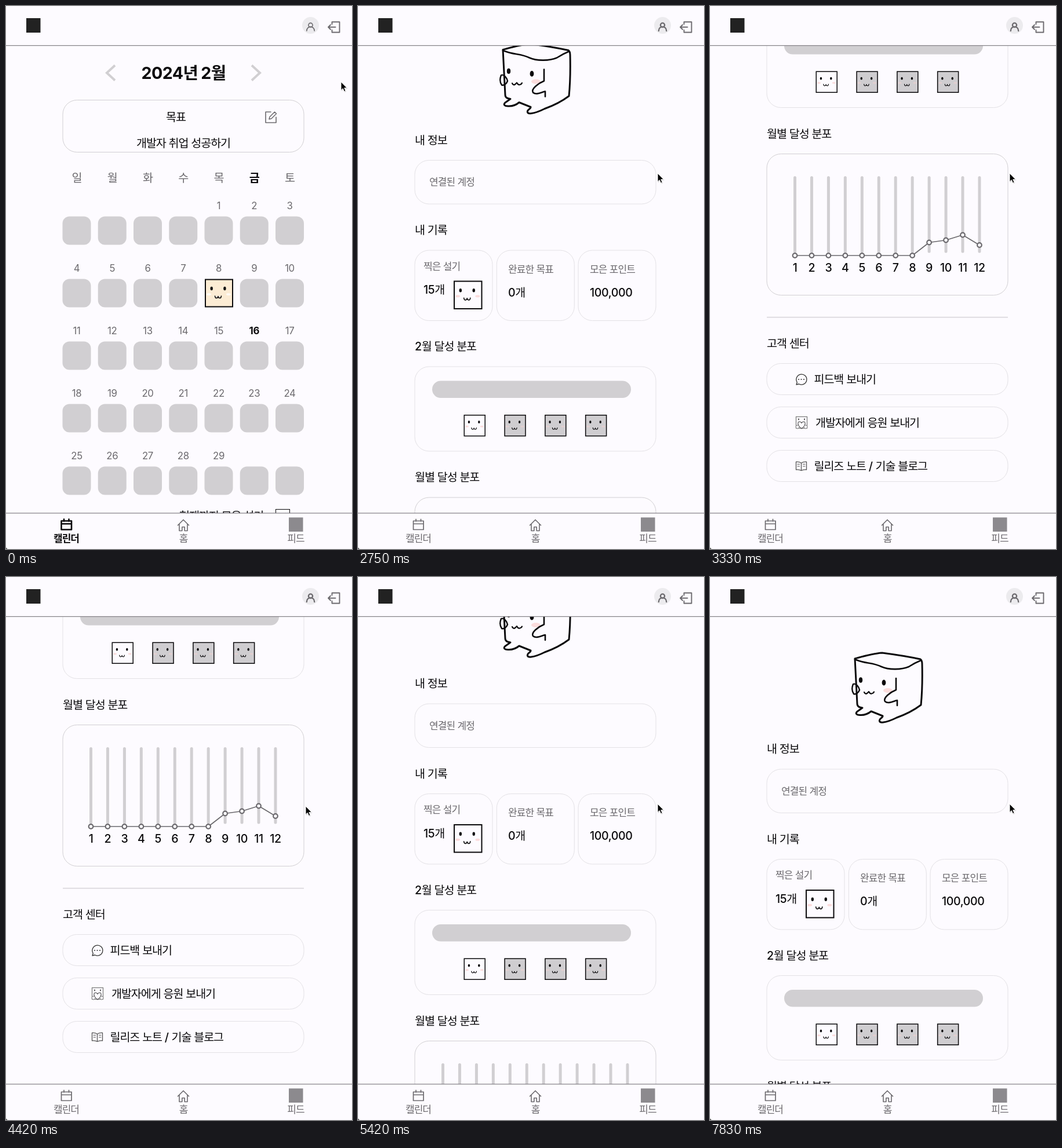
Write an HTML page that moves like this. It is 597x938 px and loops after 8.08 s.

```html
<!DOCTYPE html>
<html lang="ko">
<head>
<meta charset="utf-8">
<title>Calendar and profile</title>
<style>
  html, body { margin: 0; width: 100%; height: 100%; overflow: hidden; background: #fdfbff; }
  svg { display: block; width: 597px; height: 938px; }
  text { font-family: Inter, "Noto Sans CJK KR", "Noto Sans CJK", sans-serif; letter-spacing: -.02em; white-space: pre; }
  .ko { letter-spacing: -.056em; }
  .line { fill: none; stroke-linecap: round; stroke-linejoin: round; }
</style>
</head>
<body>
<svg id="stage" viewBox="0 0 597 938" xmlns="http://www.w3.org/2000/svg"></svg>
<script>
const LOOP = 8080, STEP = 250 / 3;
const BG = '#fdfbff', INK = '#0b0a0c', GREY = '#6b696d', CELL = '#d1cfd2', PALE = '#e3e1e5';

// ---------- drawing helpers (y of a text is its visual middle) ----------
function text(x, y, str, size = 19.6, o = {}) {
  const body = str.replace(/[가-힣]+/g, '<tspan class="ko">$&</tspan>');
  return `<text x="${x}" y="${y + size * .37}" font-size="${size}" font-weight="${o.weight || 500}"
    fill="${o.fill || INK}" text-anchor="${o.anchor || 'start'}">${body}</text>`;
}
const mid = (x, y, str, size, o = {}) => text(x, y, str, size, { ...o, anchor: 'middle' });
const box = (x, y, w, h, r, fill, stroke = 'none', sw = 1) =>
  `<rect x="${x}" y="${y}" width="${w}" height="${h}" rx="${r}" fill="${fill}" stroke="${stroke}" stroke-width="${sw}"/>`;
const line = (d, stroke, sw, more = '') =>
  `<path class="line" d="${d}" stroke="${stroke}" stroke-width="${sw}" ${more}/>`;
const oval = (x, y, rx, ry, fill, more = '') =>
  `<ellipse cx="${x}" cy="${y}" rx="${rx}" ry="${ry}" fill="${fill}" ${more}/>`;
const range = n => [...Array(n).keys()];

function face(x, y, size, fill, cheek) {
  return `<g transform="translate(${x} ${y}) scale(${size / 49})">
    ${box(1, 1, 47, 47, 0, fill, INK, 2)}
    ${oval(7, 26.5, 4, 2, cheek)}${oval(41, 26.5, 4, 2, cheek)}
    ${oval(11.7, 16.5, 2.2, 3.2, INK)}${oval(34.4, 16.5, 2.2, 3.2, INK)}
    ${line('M17.5 29.5q.5 4 3 3.5 2.5-.5 2.5-3 0 2.500 2.500 3 2.500.500 3-3.500', INK, 1.6)}</g>`;
}

// ---------- calendar page ----------
function calendar() {
  const colX = i => 122 + 61.25 * i;
  let s = line('M188 102.500L174 115.500L188 128.500M424 102.500L438 115.500L424 128.500', CELL, 4,
    'style="stroke-linecap:butt;stroke-linejoin:miter"');
  s += mid(306, 115, '2024년 2월', 28.6, { weight: 700 });
  s += box(98, 162.5, 416, 90, 24.5, 'none', CELL);
  s += mid(293, 192, '목표') + mid(306, 237, '개발자 취업 성공하기');
  s += line('M457 183H448V201.500H466V192', GREY, 1.6);
  s += line('M454 195.500L455 191.500L463.500 183L466.500 186L458 194.500Z', GREY, 1.5);
  [...'일월화수목금토'].forEach((d, i) => {
    s += mid(colX(i), 297, d, 19.6, i == 5 ? { weight: 700 } : { weight: 400, fill: GREY });
  });
  for (const i of range(35)) {
    const x = colX(i % 7), y = 363.5 + 108 * Math.floor(i / 7), day = i - 3;
    if (day > 0 && day < 30)
      s += mid(x, y - 18.5, String(day), 16.8, day == 16 ? { weight: 700 } : { weight: 400, fill: GREY });
    s += day == 8 ? face(x + .5 - 24.5, y - .5 + .5, 49, '#fcecd4', '#fffaf4')
                  : box(x - 24.5, y, 49, 49, 12, CELL);
  }
  return s + text(299, 880.5, '현재까지 모은 설기') + face(465, 869, 25, BG, '#fbe3e3');
}

// ---------- profile page, in scroll coordinates ----------
function mascot() {
  return `<path class="line" d="M250 141C264 137 283 132 297 131C320 134 345 138 363 142Q366 144 366 150
      Q367 190 364 221C352 230 336 238 322 243Q308 250 299 251C291 252 291 247 295 244Q298 242 298 240
      L278 232Q270 239 259 238.500C250 238 251 234 256 231L263 226Q254 225 254 219Q252 180 250 141Z"
      fill="#eeecef" stroke="${INK}" stroke-width="3"/>` +
    line('M250 142C266 150 280 147 296 155C309 161 331 160 343 155Q354 148 364 144', INK, 2.6) +
    oval(307, 196, 8, 4, '#fbdcdc') +
    oval(260, 178, 3.2, 4.8, INK) + oval(300, 182.5, 3.4, 5, INK) +
    line('M266 199q2 4 5 2l3-3q2 4 5 3.500 3-.5 4-3', INK, 2.2) +
    `<path class="line" d="M247 185C252 183 257 190 258 195C256 201 251 203 248 202Q243 195 247 185Z"
      fill="#eeecef" stroke="${INK}" stroke-width="2.4"/>` +
    line('M321 175V195C311 199 298 209 302 215C308 220 317 214 323 213L323 222', INK, 2.6);
}

function chart() {
  const x = i => 146.5 + 28.95 * i;
  const tail = [1067.5, 1063.5, 1054.5, 1072], y = i => i < 8 ? 1090 : tail[i - 8];
  const months = range(12);
  return box(98, 914.5, 416, 244, 24.5, 'none', CELL) +
    months.map(i => line(`M${x(i)} 955.500V1083`, CELL, 5)).join('') +
    line('M' + months.map(i => x(i) + ' ' + y(i)).join('L'), GREY, 1.7) +
    months.map(i => oval(x(i), y(i), 3.8, 3.8, BG, `stroke="${GREY}" stroke-width="2.2"`) +
      mid(x(i), 1110.5, String(i + 1))).join('');
}

function profile() {
  const soft = { weight: 400, fill: GREY };
  let s = mascot();
  s += text(98, 297, '내 정보') + box(98, 332, 416, 75.5, 24.5, 'none', PALE) + text(123, 369.5, '연결된 계정', 17, soft);
  s += text(98, 452.5, '내 기록');
  for (const x of [98, 239.3, 380]) s += box(x, 487.5, 134, 121.5, 24.5, 'none', PALE);
  s += text(113, 515, '찍은 설기', 17, soft) + text(113, 555.5, '15개') + face(165, 540, 49.5, BG, '#fbdcdc');
  s += text(259, 520, '완료한 목표', 17, soft) + text(259, 560, '0개');
  s += text(400, 520, '모은 포인트', 17, soft) + text(400, 560, '100,000');
  s += text(98, 653.5, '2월 달성 분포') + box(98, 688.5, 416, 146, 24.5, 'none', PALE);
  s += box(128, 713, 343, 29.5, 14.75, CELL);
  for (const i of range(4)) s += face(182.5 + 69.8 * i, 771.5, 37.5, i ? '#cfcdd0' : BG, i ? '#e2cfd0' : '#fbdcdc');
  s += text(98, 879.5, '월별 달성 분포') + chart();
  s += box(98, 1195.8, 416, 1.8, 0, '#dcdade') + text(98, 1242, '고객 센터');
  for (const i of range(3)) s += box(98, 1276.5 + 75 * i, 416, 54, 24.5, 'none', PALE);
  s += text(179.5, 1304, '피드백 보내기') + text(182, 1378.7, '개발자에게 응원 보내기') +
    text(179.5, 1453.5, '릴리즈 노트 / 기술 블로그');
  s += line('M149 1313L150.300 1309A9 9 0 1 1 153.500 1312Z', '#333', 1.3) +
    [153, 157.5, 162].map(x => oval(x, 1304, 1, 1, '#333')).join('');
  s += box(148.5, 1368.5, 19, 20, 0, BG, '#777', 1.2) +
    oval(153, 1373, .9, 1.4, '#333') + oval(163, 1373, .9, 1.4, '#333') +
    `<path class="line" d="M158 1389C150 1383 151 1377 154.500 1377Q157 1377 158 1379.500Q159 1377 161.500 1377
      C165 1377 166 1383 158 1389Z" fill="#fbdfd8" stroke="#444" stroke-width="1.100"/>` +
    [151, 165].map(x => oval(x, 1386, 3, 3, BG, 'stroke="#777"')).join('');
  s += line('M157.500 1448.500Q154 1446 148.500 1446.500V1460Q154 1459.500 157.500 1461.500Q161 1459.500 166.500 1460V1446.500Q161 1446 157.500 1448.500V1461', '#555', 1.3) +
    line('M151 1450.500h3.500M151 1454h3.500M160.500 1450.500h3.500M160.500 1454h3.500', '#555', 1.1);
  return s;
}

// ---------- fixed header and tab bar ----------
const person = 'M518.800 43C519 33.500 532 33.500 532.200 43M521.900 33a3.600 3.600 0 1 0 7.200 0a3.600 3.600 0 1 0 -7.200 0';
function bars() {
  return box(0, 0, 597, 68, 0, BG) + box(0, 67.8, 597, 1.1, 0, '#77757a') +
    box(35, 21, 24.5, 25, 0, '#222') +
    oval(525.5, 33.5, 14.5, 14.5, '#ecebee') + `<path id="person" class="line" d="${person}"/>` +
    line('M562.500 31.500V27.500H575.500V45.500H562.500V41.500M556 36.500H568.500M560 32.500L556 36.500L560 40.500', GREY, 1.9) +
    box(0, 876, 597, 62, 0, BG) + box(0, 875.5, 597, 1.1, 0, '#77757a') +
    `<g id="tabOn">${tab(INK, 2.6, 700)}</g><g id="tabOff">${tab(GREY, 1.7, 400)}</g>` +
    line('M296.500 897L306 887.500L315.500 897M299 895V906.500H303.800V900H308.200V906.500H313V895', GREY, 1.6) +
    mid(306, 920, '홈', 17, { weight: 400, fill: GREY }) +
    box(488, 883.5, 24.5, 24.5, 0, '#8c8a8e') + mid(500, 920, '피드', 17, { weight: 400, fill: GREY }) +
    '<path d="M0 935Q.5 937.500 3 938H0Z" fill="#333"/>';
}
function tab(color, sw, weight) {
  return line('M95.500 889.500H113V904.500H95.500ZM95.500 894.500H113M100 886.500V890M108.500 886.500V890', color, sw) +
    mid(104, 920, '캘린더', 17, { weight, fill: color });
}

const overlay = `<g id="status"><path d="M0 919.500H181Q185.500 919.500 185.500 924V938H0Z" fill="#cbdcfb" stroke="#b4c6e8"/>
  ${text(3, 929.5, 'https://100seolgi.click/my-page', 12, { weight: 400, fill: '#27303f' })}</g>
  <g id="arrow"><path d="M.8 1.500V16L4.300 12.800L6.500 18L9 17L6.800 11.900H11.500Z" fill="#000" opacity=".18"/>
  <path d="M0 0V14.500L3.300 11.500L5.500 16.700L8 15.600L5.800 10.600H10.300Z" fill="#000" stroke="#fff" stroke-width="1" stroke-linejoin="round"/></g>
  <path id="hand" d="M-2 1.200C-2.300-1 .3-1.300 .9 .5L2.300 6Q3.800 4.400 5 6.200Q6.700 5 7.600 6.800Q9.500 6.200 10 8.200L10.700 12
    Q10.800 14 9.500 16V17.500H2.800Q1 14-1.800 11.600C-3.800 9.300-1.500 8.300 .5 10Z" fill="#fff" stroke="#000" stroke-width="1.200" stroke-linejoin="round"/>`;

const stage = document.getElementById('stage');
stage.innerHTML = `<rect width="597" height="938" fill="${BG}"/><g id="calendar">${calendar()}</g>
  <g id="profile">${profile()}</g>${bars()}${overlay}`;
const el = id => document.getElementById(id);
const show = (id, on) => el(id).setAttribute('visibility', on ? 'visible' : 'hidden');

// ---------- motion: [time, values...] ----------
const pointer = [[0, 578, 131], [80, 581, 133], [250, 583, 113], [420, 568, 68], [580, 546, 37], [750, 531, 27],
  [830, 531, 27], [920, 528, 30], [1000, 526.5, 32], [1500, 526.5, 32], [1580, 526, 37], [1750, 524, 88],
  [2000, 520, 225], [2250, 517, 289], [3580, 517, 289], [3750, 517, 304], [4000, 517, 365], [4250, 517, 398],
  [4330, 517, 398], [4580, 517, 392]];
const scroll = [[2670, 0], [2750, 65.5], [2830, 185], [2920, 325], [3000, 445], [3080, 540], [3170, 605], [3250, 643],
  [3330, 659], [4670, 659], [4750, 650], [4830, 627], [4920, 592], [5000, 545.5], [5080, 455], [5170, 350],
  [5250, 255], [5330, 175], [5420, 113], [5500, 68], [5580, 36], [5670, 15], [5750, 4], [5830, 0]];
const status = [[1080, 0], [1330, 1], [2250, 1], [2420, 0]];

function at(keys, t) {
  const i = keys.findIndex(k => k[0] > t);
  if (i == 0) return keys[0].slice(1);
  if (i < 0) return keys[keys.length - 1].slice(1);
  const a = keys[i - 1], b = keys[i], p = (t - a[0]) / (b[0] - a[0]);
  return a.slice(1).map((v, j) => v + (b[j + 1] - v) * p);
}

function draw(time) {
  // The screen refreshes twelve times a second.
  const t = Math.round(Math.floor((time % LOOP + 4) / STEP) * STEP / 10) * 10;
  const onProfile = t >= 1500, hover = t >= 920 && t < 1670;
  show('calendar', !onProfile);
  show('profile', onProfile);
  show('tabOn', !onProfile);
  show('tabOff', onProfile);
  show('hand', hover);
  show('arrow', !hover);
  el('profile').setAttribute('transform', `translate(0 ${-at(scroll, t)[0]})`);
  el('person').setAttribute('stroke', hover ? INK : GREY);
  el('person').setAttribute('stroke-width', onProfile ? 2.3 : 1.6);
  el('status').setAttribute('opacity', at(status, t)[0]);
  const [x, y] = at(pointer, t);
  el(hover ? 'hand' : 'arrow').setAttribute('transform', `translate(${x} ${y})`);
}

const start = performance.now();
function tick() {
  draw(performance.now() - start);
  requestAnimationFrame(tick);
}
tick();
</script>
</body>
</html>
```
